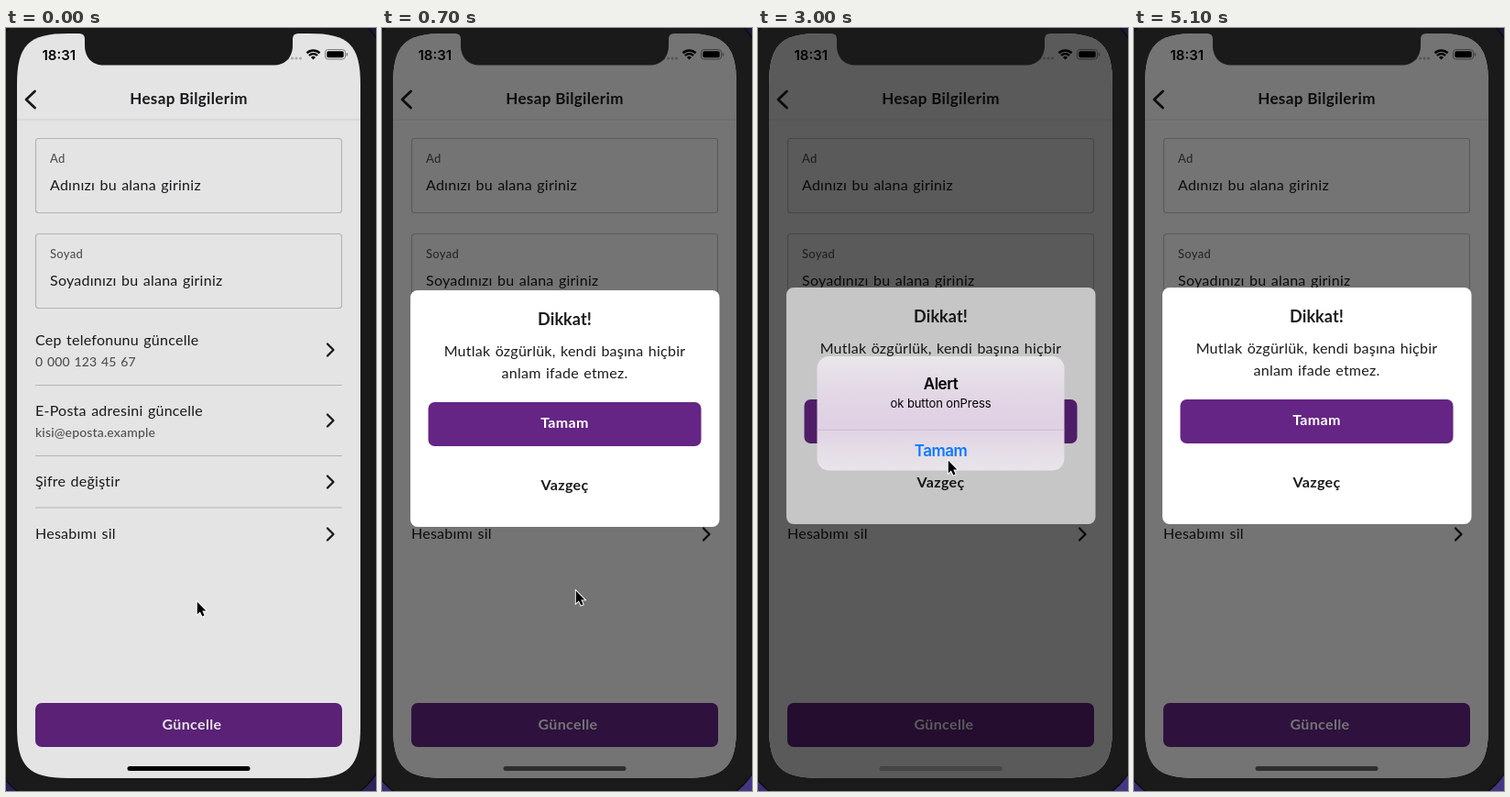
Animation of 404x832 px, one loop 5200 ms. Source, as an HTML page with a canvas:

```html
<!DOCTYPE html>
<html lang="tr">
<head>
<meta charset="utf-8">
<title>Hesap Bilgilerim</title>
<style>
  html, body { margin: 0; width: 100%; height: 100%; overflow: hidden; background: #1b1a1b; }
  canvas { display: block; width: 404px; height: 832px; }
</style>
</head>
<body>
<canvas id="stage"></canvas>
<script>
const W = 404, H = 832, LOOP = 5200, STEP = 100;
const INK = '#1c1b1d', PURPLE = '#652584', BEZEL = '#1b1a1b';
const LATO = 'Lato, "Open Sans", sans-serif', INTER = 'Inter, Roboto, sans-serif';

const canvas = document.getElementById('stage');
const ctx = canvas.getContext('2d');
const ratio = window.devicePixelRatio || 1;
canvas.width = W * ratio;
canvas.height = H * ratio;

const STYLES = {
  body:   { font: `400 16px ${LATO}`, spacing: 0.25, words: 1 },
  label:  { font: `500 13px ${LATO}`, spacing: 0.3, words: 0 },
  detail: { font: `500 14px ${LATO}`, spacing: 0.15, words: 1 },
  title:  { font: `700 17px ${LATO}`, spacing: 0.35, words: 0 },
  button: { font: `700 16px ${LATO}`, spacing: 0.35, words: 0 },
  modal:  { font: `700 18px ${LATO}`, spacing: 0.1, words: 0 },
  clock:  { font: `600 15px ${INTER}`, spacing: 0, words: 0 },
  alert:  { font: `600 17px ${INTER}`, spacing: -0.5, words: 0 },
  note:   { font: `400 13px ${INTER}`, spacing: -0.1, words: 0 }
};

// Pointer tip as [time, x, y]
const POINTER = [
  [0, 208, 625], [300, 209, 621], [700, 211, 613], [1100, 220, 530],
  [1500, 227, 450], [1800, 222, 432], [2400, 214, 405], [2600, 210, 440],
  [3000, 207, 471], [3300, 202, 440], [3600, 168, 273], [3900, 174, 141],
  [4200, 178, 14], [4300, 178, -20]
];

const clamp = v => Math.max(0, Math.min(1, v));
const ramp = (t, from, to) => clamp((t - from) / (to - from));
const mix = (a, b, k) => a + (b - a) * k;
const rgb = (a, b, k) => `rgb(${a.map((v, i) => Math.round(mix(v, b[i], k))).join(',')})`;

function text(str, x, y, style, color = INK, align = 'left') {
  const s = STYLES[style];
  ctx.font = s.font;
  ctx.letterSpacing = s.spacing + 'px';
  ctx.wordSpacing = s.words + 'px';
  ctx.textAlign = align;
  ctx.fillStyle = color;
  ctx.fillText(str, x, y);
}

function roundPath(x, y, w, h, r) {
  ctx.beginPath();
  ctx.roundRect(x, y, w, h, r);
}

// Rounded rectangle whose corners ease into the sides
function smoothPath(x, y, w, h, r) {
  const reach = r * 1.4, pull = (r * 2.343 - reach) / 3;
  ctx.beginPath();
  for (const [cx, cy, ax, ay, bx, by] of [
    [x, y, 0, 1, 1, 0], [x + w, y, -1, 0, 0, 1],
    [x + w, y + h, 0, -1, -1, 0], [x, y + h, 1, 0, 0, -1]
  ]) {
    ctx.lineTo(cx + ax * reach, cy + ay * reach);
    ctx.bezierCurveTo(cx + ax * pull, cy + ay * pull, cx + bx * pull, cy + by * pull,
      cx + bx * reach, cy + by * reach);
  }
  ctx.closePath();
}

function box(x, y, w, h, r, fill) {
  roundPath(x, y, w, h, r);
  ctx.fillStyle = fill;
  ctx.fill();
}

function line(points, color, width) {
  ctx.beginPath();
  points.forEach(([x, y]) => ctx.lineTo(x, y));
  ctx.strokeStyle = color;
  ctx.lineWidth = width;
  ctx.stroke();
}

function dim(alpha) {
  ctx.fillStyle = `rgba(0,0,0,${alpha})`;
  ctx.fillRect(12, 6, 375, 812);
}

function drawBody(fade) {
  const wall = ctx.createLinearGradient(0, 0, W, H);
  wall.addColorStop(0, '#14112a');
  wall.addColorStop(0.5, rgb([38, 30, 74], [46, 35, 88], fade));
  wall.addColorStop(1, rgb([45, 35, 88], [70, 54, 132], fade));
  ctx.fillStyle = wall;
  ctx.fillRect(0, 0, W, H);
  box(-15, -21, 429, 866, 67, BEZEL);
  ctx.strokeStyle = '#0e0d10';
  ctx.lineWidth = 1.5;
  ctx.stroke();
}

function drawNotch() {
  ctx.beginPath();
  ctx.moveTo(80, 5);
  ctx.lineTo(80, 6);
  ctx.quadraticCurveTo(86, 6, 86, 12);
  ctx.lineTo(86, 19);
  ctx.bezierCurveTo(86, 32, 94, 40.6, 107, 40.6);
  ctx.lineTo(292, 40.6);
  ctx.bezierCurveTo(305, 40.6, 313, 32, 313, 19);
  ctx.lineTo(313, 12);
  ctx.quadraticCurveTo(313, 6, 319, 6);
  ctx.lineTo(319, 5);
  ctx.fillStyle = BEZEL;
  ctx.fill();
}

function drawStatus() {
  text('18:31', 39.5, 34.5, 'clock', '#000');
  for (let i = 0; i < 4; i++) box(306.5 + i * 4.5, 31.5, 3, 3, 1.5, '#bdbdbd');

  ctx.strokeStyle = '#000';
  ctx.lineWidth = 2.3;
  ctx.lineCap = 'butt';
  for (const r of [10, 6.4]) {
    ctx.beginPath();
    ctx.arc(335.5, 34.5, r, -Math.PI * 0.75, -Math.PI * 0.25);
    ctx.stroke();
  }
  ctx.beginPath();
  ctx.moveTo(335.5, 34.5);
  ctx.arc(335.5, 34.5, 3.6, -Math.PI * 0.75, -Math.PI * 0.25);
  ctx.fillStyle = '#000';
  ctx.fill();

  roundPath(348.5, 23.5, 22, 10.5, 3);
  ctx.strokeStyle = '#8b8b8b';
  ctx.lineWidth = 1;
  ctx.stroke();
  box(350.3, 25.3, 18.4, 6.9, 1.6, '#000');
  box(371.7, 27, 1.4, 3.8, 0.7, '#8b8b8b');
}

function drawField(y, label, hint) {
  roundPath(32.5, y + 0.5, 334, 81, 3);
  ctx.strokeStyle = '#c9c9cc';
  ctx.lineWidth = 1.2;
  ctx.stroke();
  text(label, 48, y + 26.5, 'label', '#59585b');
  text(hint, 48, y + 57, 'body');
}

function chevron(y) {
  ctx.lineCap = ctx.lineJoin = 'round';
  line([[351, y - 6.5], [357.5, y], [351, y + 6.5]], INK, 2.3);
  ctx.lineCap = 'butt';
}

const divider = y => line([[32, y], [367, y]], '#c9c9cc', 1.2);

function drawPage() {
  ctx.fillStyle = '#fff';
  ctx.fillRect(12, 6, 375, 812);
  drawStatus();
  ctx.lineCap = ctx.lineJoin = 'round';
  line([[31.5, 69], [22, 78], [31.5, 87]], INK, 2.8);
  ctx.lineCap = 'butt';
  text('Hesap Bilgilerim', 199.5, 83, 'title', INK, 'center');
  line([[12, 100], [387, 100]], '#e6e6e7', 1);

  drawField(120, 'Ad', 'Adınızı bu alana giriniz');
  drawField(224, 'Soyad', 'Soyadınızı bu alana giriniz');

  text('Cep telefonunu güncelle', 32, 345.5, 'body');
  text('0 000 123 45 67', 32, 369, 'detail', '#59585b');
  text('E-Posta adresini güncelle', 32, 422.5, 'body');
  text('kisi@eposta.example', 32, 446, 'detail', '#59585b');
  text('Şifre değiştir', 32, 500, 'body');
  text('Hesabımı sil', 32, 557, 'body');
  [351, 428, 495, 552].forEach(chevron);
  [389.5, 466.5, 523].forEach(divider);

  box(32, 736, 335, 48, 7, PURPLE);
  text('Güncelle', 203, 765, 'button', '#fff', 'center');
}

function drawModal(top) {
  box(31, top, 337.5, 258, 8, '#fff');
  text('Dikkat!', 199.5, top + 37.5, 'modal', INK, 'center');
  text('Mutlak özgürlük, kendi başına hiçbir', 199.5, top + 71.5, 'body', INK, 'center');
  text('anlam ifade etmez.', 199.5, top + 95.5, 'body', INK, 'center');
  box(50.5, top + 122, 298, 48, 7, PURPLE);
  text('Tamam', 199.5, top + 150, 'button', '#fff', 'center');
  text('Vazgeç', 199.5, top + 218, 'button', INK, 'center');
}

function drawAlert(alpha, scale) {
  ctx.save();
  ctx.globalAlpha = alpha;
  ctx.translate(199.5, 420);
  ctx.scale(scale, scale);
  ctx.translate(-199.5, -420);
  const glass = ctx.createLinearGradient(0, 358, 0, 482);
  glass.addColorStop(0, '#e9e7ea');
  glass.addColorStop(0.3, '#e3d8e6');
  glass.addColorStop(0.6, '#dfd0e3');
  glass.addColorStop(0.75, '#e3d9e6');
  glass.addColorStop(1, '#e8e5ea');
  box(64.5, 358, 270, 124.5, 13, glass);
  text('Alert', 199.5, 394, 'alert', '#000', 'center');
  text('ok button onPress', 199.5, 414, 'note', '#000', 'center');
  line([[64.5, 438.3], [334.5, 438.3]], '#c3b7c7', 0.8);
  text('Tamam', 199.5, 466.5, 'alert', '#0a7aff', 'center');
  ctx.restore();
}

function drawPointer(t) {
  const i = POINTER.findIndex(p => p[0] > t);
  if (i < 0) return;
  const [t0, x0, y0] = POINTER[i - 1], [t1, x1, y1] = POINTER[i];
  const k = ramp(t, t0, t1);
  ctx.save();
  ctx.translate(mix(x0, x1, k), mix(y0, y1, k));
  ctx.beginPath();
  ctx.moveTo(0.8, 0.8);
  [[0.8, 14.3], [3.9, 11.4], [6.3, 16.6], [8.6, 15.6], [6.3, 10.6], [10.4, 10.4]]
    .forEach(([x, y]) => ctx.lineTo(x, y));
  ctx.closePath();
  ctx.lineJoin = 'miter';
  ctx.strokeStyle = '#fff';
  ctx.lineWidth = 1.9;
  ctx.stroke();
  ctx.fillStyle = '#000';
  ctx.fill();
  ctx.restore();
}

function render(t) {
  const fade = ramp(t, 0, 250);
  const closing = ramp(t, 3050, 3400);
  const opening = ramp(t, 1750, 2100);
  const alert = opening * (1 - closing);
  const modalTop = 283 + 179.5 * Math.exp((300 - t) / 98);

  ctx.setTransform(ratio, 0, 0, ratio, 0, 0);
  drawBody(fade);
  ctx.save();
  smoothPath(12, 6, 375, 812, 40);
  ctx.clip();
  drawPage();
  dim(mix(0.105, 0.545, fade));
  if (modalTop < H) drawModal(modalTop);
  if (alert > 0) {
    dim(0.225 * alert);
    drawAlert(alert, mix(1.15, 1, opening));
  }
  const grey = Math.round(46 * fade + 22 * alert);
  box(132.5, 805, 134, 5, 2.5, `rgb(${grey},${grey},${grey})`);
  ctx.restore();
  drawNotch();
  drawPointer(t);
}

const start = performance.now();
function tick() {
  const t = (performance.now() - start) % LOOP;
  render(Math.floor(t / STEP) * STEP);
  requestAnimationFrame(tick);
}
tick();
</script>
</body>
</html>
```
